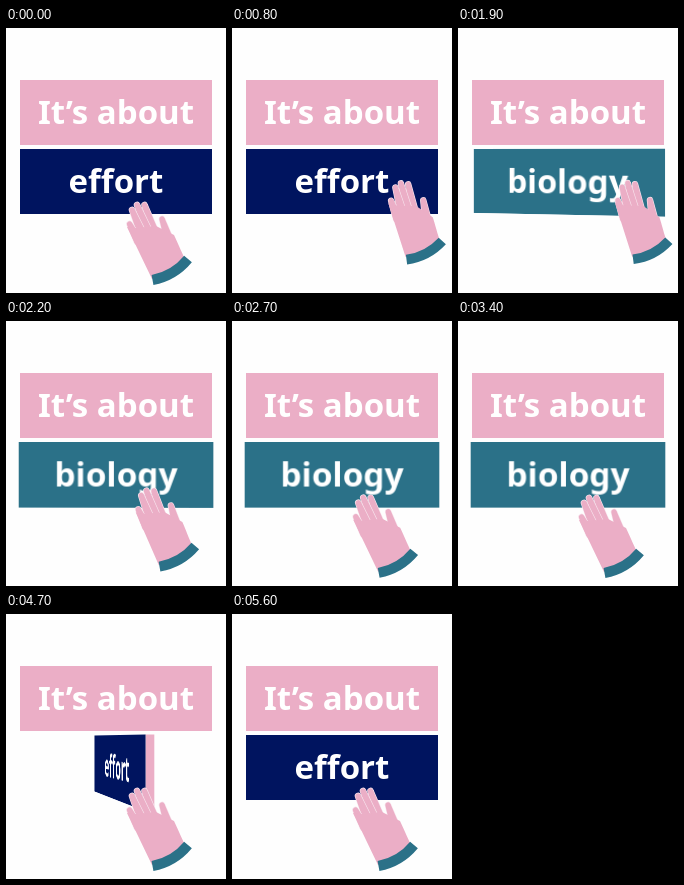
Recreate the animation shown at these times as an HTML page. Size 220 by 265 pixels, loop 5.8 s.

```html
<!DOCTYPE html>
<html lang="en">
<head>
<meta charset="utf-8">
<title>It’s about</title>
<style>
  html, body { margin: 0; width: 100%; height: 100%; overflow: hidden; background: #fefefe; }
  #stage {
    position: absolute; width: 220px; height: 265px; overflow: hidden;
    perspective: 590px; perspective-origin: 110px 124px;
    font: bold 33px/64px "Noto Sans", "Open Sans", sans-serif;
    color: #fff; text-align: center; white-space: nowrap;
  }
  #title, #sign { position: absolute; left: 14px; width: 192px; height: 65px; }
  #title { top: 52px; line-height: 63px; background: #ebaec6; }
  #sign { top: 121px; transform-style: preserve-3d; }
  #sign div { position: absolute; width: 100%; height: 100%; backface-visibility: hidden; }
  #sign .front { background: #00145f; }
  #sign .back { background: #2b7188; transform: rotateY(180deg) translateZ(8px); }
  #sign .side { background: #ebaec6; width: 8px; left: 92px; }
  #sign .left { transform: translateZ(-4px) rotateY(-90deg) translateZ(96px); }
  #sign .right { transform: translateZ(-4px) rotateY(90deg) translateZ(96px); }
  svg { position: absolute; left: 0; top: 0; }
</style>
</head>
<body>
<div id="stage">
  <div id="title">It’s about</div>
  <div id="sign">
    <div class="front">effort</div>
    <div class="back">biology</div>
    <div class="side left"></div>
    <div class="side right"></div>
  </div>
</div>
<svg width="220" height="265" fill="none" stroke-linejoin="round">
  <g id="hand">
    <g id="fingers"></g>
    <path fill="#ebaec6" d="M121 199L146 251Q168 247 180 233C175 223 171 213 168 207L150 198L130 200Z"/>
    <path id="cuff" stroke="#2b7188" stroke-width="10" d="M146.5 252Q168 248 182 231"/>
  </g>
</svg>
<script>
const LOOP = 5800, STEP = 100;
const [sign, hand, cuff, fingers] =
  ['sign', 'hand', 'cuff', 'fingers'].map(id => document.getElementById(id));

// Tapered finger with a pale rim
function finger(tipX, tipY, baseX, baseY) {
  const d = `M${tipX} ${tipY}L${baseX - 2} ${baseY}H${baseX + 2}Z`;
  return `<path stroke="#f8e6ee" stroke-width="6.6" d="${d}"/>` +
         `<path stroke="#ebaec6" fill="#ebaec6" stroke-width="5.4" d="${d}"/>`;
}
fingers.innerHTML = finger(156, 191, 163, 212) + finger(138.5, 177, 149, 206) +
  finger(131, 177, 143, 206) + finger(126, 182, 137, 208) + finger(123.5, 196, 133, 214);

// Smooth step from 0 to 1 around a middle time
const ease = (t, middle, width) => 1 / (1 + Math.exp((middle - t) / width));

// Half turn that begins at a given time
const flip = t => t > 0 ? 180 * ease(t, 372, 83) : 0;

function draw(now) {
  const t = Math.floor(now % LOOP / STEP) * STEP;
  sign.style.transform = `rotateY(${flip(t - 1300) + flip(t - 4300)}deg)`;

  const reach = ease(t, 743, 90) - ease(t, 1990, 130);
  const x = 164 + 43 * reach;
  const y = 243 - 24 * reach - 16 * reach * (1 - reach);
  const turn = 12 * reach, scale = 1 - .08 * reach ** 3;
  hand.setAttribute('transform',
    `translate(${x} ${y}) rotate(${turn}) scale(${scale}) translate(-164 -243)`);
  cuff.setAttribute('transform', `rotate(${-.6 * turn} 164 243)`);
}

const start = performance.now();
function tick() {
  draw(performance.now() - start);
  requestAnimationFrame(tick);
}
tick();
</script>
</body>
</html>
```
